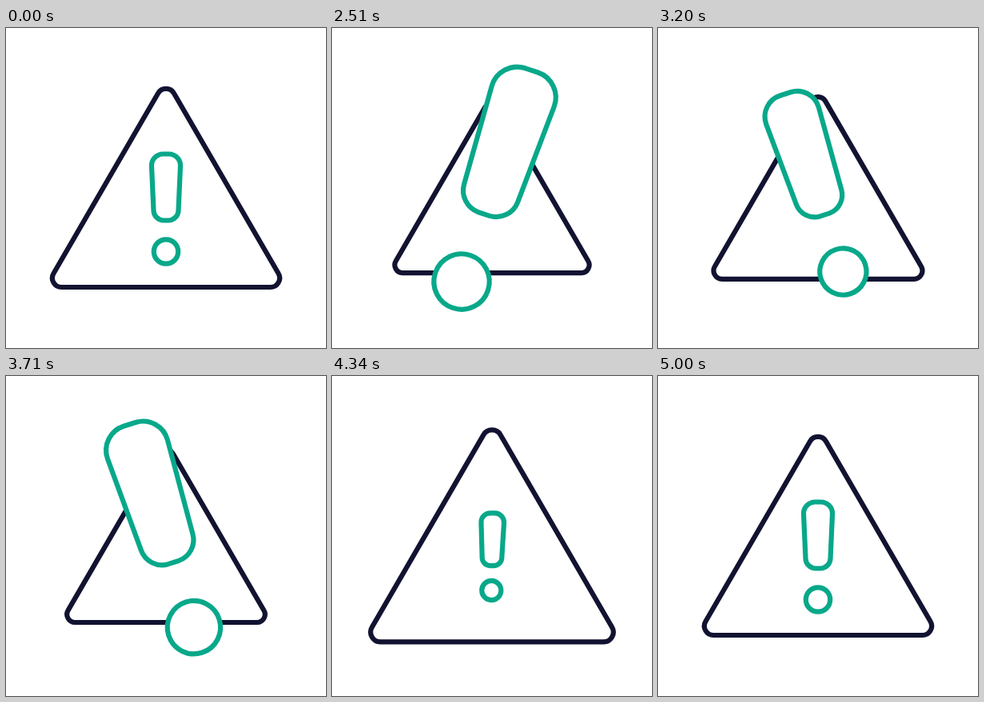
Recreate the animation shown at these times as an HTML page. Size 400 by 400 pixels, loop 5.03 s.

```html
<!DOCTYPE html>
<html lang="en">
<head>
<meta charset="utf-8">
<title>Warning sign</title>
<style>
  html, body { margin: 0; width: 100%; height: 100%; overflow: hidden; background: #fff; }
  svg { display: block; width: 100%; height: 100%; }
  path, circle { fill: #fff; stroke-width: 6.2; stroke-linejoin: round; vector-effect: non-scaling-stroke; }
  #sign { stroke: #121331; }
  #mark { stroke: #08a88a; }
</style>
</head>
<body>
<svg viewBox="0 0 400 400">
  <g id="sign">
    <path d="M-10-118.3A11.5 11.5 0 0 1 10-118.3L140.5 106.7A11.5 11.5 0 0 1 130.5 124H-130.5A11.5 11.5 0 0 1-140.5 106.7Z"/>
  </g>
  <g id="mark">
    <path d="M-3.6-69H3.6A14.5 14.5 0 0 1 18-54L15.5 1.8A12.7 12.7 0 0 1 3.2 14H-3.2A12.7 12.7 0 0 1-15.5 1.8L-18-54A14.5 14.5 0 0 1-3.6-69Z"/>
    <circle cy="53" r="15.2"/>
  </g>
</svg>
<script>
  const LOOP = 5030, REST = 2030, STEP = 30;
  const BEGIN = 2000, SHORT = 400, LONG = 600;

  // 0 before the move, 1 after it, smooth between
  function ease(t, from, length) {
    const u = Math.min(Math.max((t - from) / length, 0), 1);
    return u * u * (3 - 2 * u);
  }

  // Swell to the peak twice with a dip between, then overshoot and settle
  function pulse(t, { rest, peak, dip, over, under }) {
    const lengths = [SHORT, LONG, LONG, LONG, SHORT, SHORT];
    let value = rest, from = BEGIN;
    [peak, dip, peak, over, under, rest].forEach((next, i, all) => {
      value += (next - (i ? all[i - 1] : rest)) * ease(t, from, lengths[i]);
      from += lengths[i];
    });
    return value;
  }

  // Lean right, lean left, then a small damped wobble
  function tilt(t) {
    const lean = 19.5, wobble = 2.2, settle = BEGIN + SHORT + 2 * LONG;
    return lean * ease(t, BEGIN, LONG)
      - 2 * lean * ease(t, BEGIN + LONG, LONG + 80)
      + (lean + wobble) * ease(t, settle, LONG)
      - 2 * wobble * ease(t, settle + LONG, SHORT)
      + wobble * ease(t, settle + LONG + SHORT, SHORT);
  }

  const signSize = { rest: 1, peak: .847, dip: .943, over: 1.118, under: .94 };
  const markSize = { rest: 1, peak: 2.33, dip: 1.77, over: .66, under: 1.13 };
  const markY = { rest: 226.5, peak: 201.5, dip: 210.3, over: 229, under: 218.4 };

  const sign = document.getElementById('sign');
  const mark = document.getElementById('mark');
  const begin = performance.now();

  function draw() {
    const now = (performance.now() - begin) % LOOP;
    const t = now < REST ? 0 : REST + STEP * Math.floor((now - REST) / STEP);
    sign.setAttribute('transform', `translate(200 200) scale(${pulse(t, signSize)})`);
    mark.setAttribute('transform',
      `translate(200 ${pulse(t, markY)}) rotate(${tilt(t)}) scale(${pulse(t, markSize)})`);
    requestAnimationFrame(draw);
  }
  draw();
</script>
</body>
</html>
```
